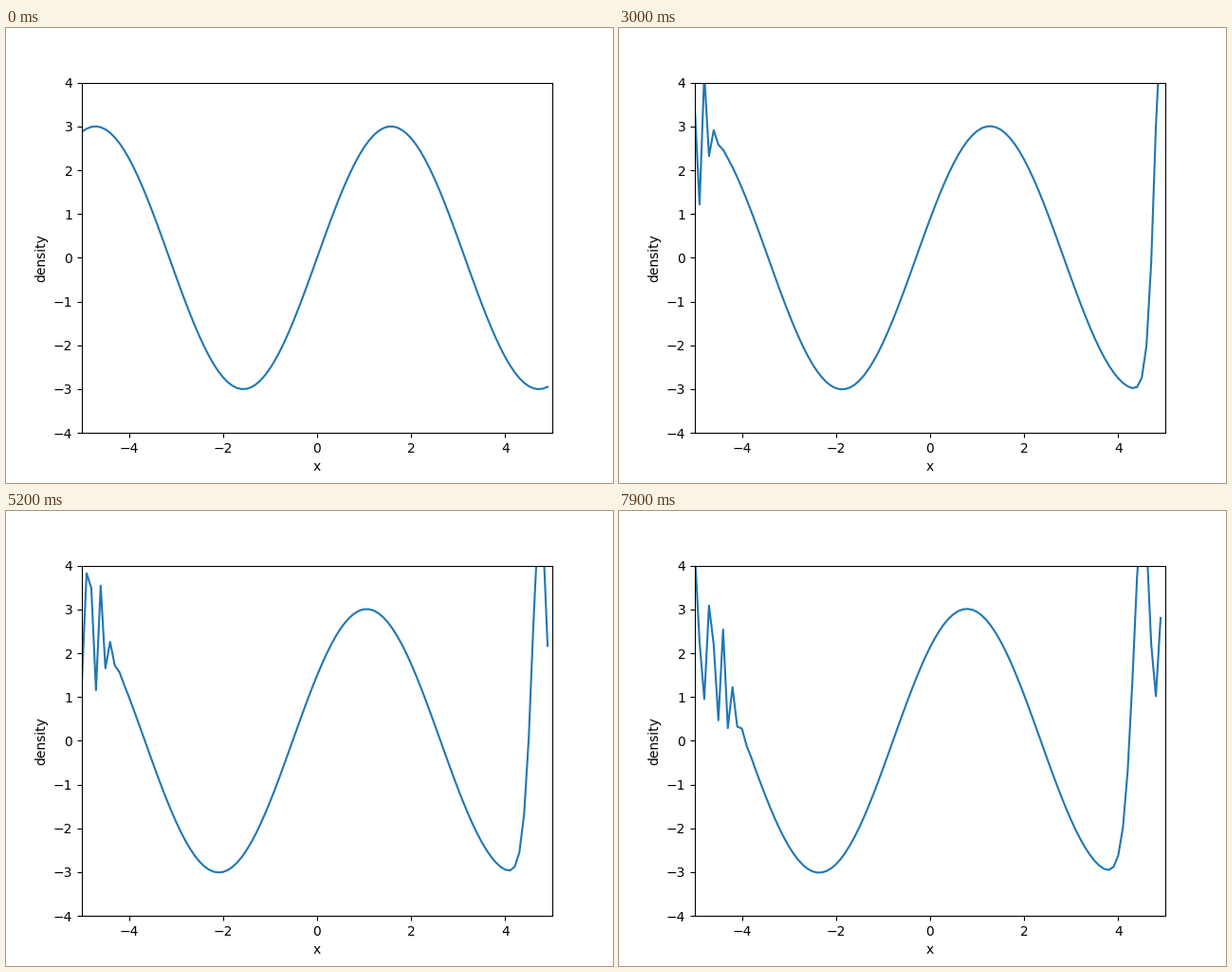
A matplotlib script that plays this animation: 640 by 480 pixels, repeating every 8 s.

```python
import numpy as np
import matplotlib.pyplot as plt
from matplotlib.animation import FuncAnimation

FRAMES = 80
DX = 0.1
DT = 0.01
SPEED = -1.0

x = -5 + DX * np.arange(100)


def step(u):
    """Forward Euler, central differences, periodic ends."""
    slope = (np.roll(u, -1) - np.roll(u, 1)) / (2 * DX)
    return u - SPEED * DT * slope


history = [3 * np.sin(x)]
for _ in range(FRAMES - 1):
    history.append(step(history[-1]))

fig, ax = plt.subplots(figsize=(6.4, 4.8), dpi=100)
ax.set_xlim(-5, 5)
ax.set_ylim(-4, 4)
ax.set_xlabel("x")
ax.set_ylabel("density")
line, = ax.plot(x, history[0])


def update(i):
    line.set_ydata(history[i])
    return line,


anim = FuncAnimation(fig, update, frames=FRAMES, interval=100,
                     repeat=True, repeat_delay=0)
plt.show()
```
